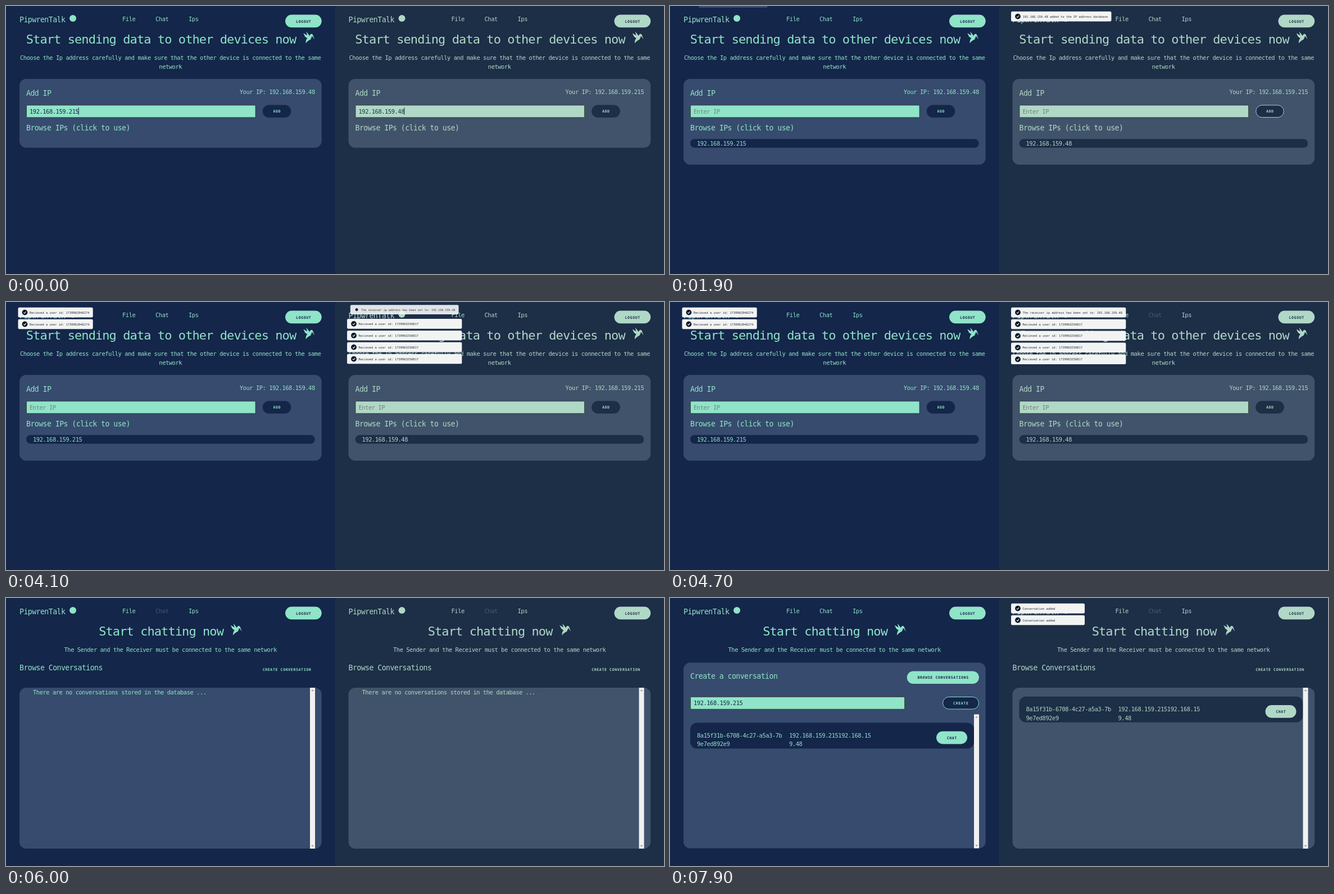
Recreate the animation shown at these times as an HTML page with a canvas. Size 1171x478 px, loop 8000 ms.

```html
<!DOCTYPE html>
<html lang="en">
<head>
<meta charset="utf-8">
<title>Two devices pairing</title>
<style>
html, body { margin: 0; width: 100%; height: 100%; overflow: hidden; background: #14264a; }
canvas { display: block; width: 1171px; height: 478px; }
</style>
</head>
<body>
<canvas id="stage" width="1171" height="478"></canvas>
<script>
const ctx = document.getElementById('stage').getContext('2d');
const LOOP = 8000, SIDE = 585.5, MID = 292.7;
const MONO = '"DejaVu Sans Mono", monospace';
const TRACK = -0.04, ADVANCE = 0.602 + TRACK;
const BODY = 5.83 / ADVANCE, TITLE = 7.4 / ADVANCE, HEAD = 12.33 / ADVANCE;

const LEFT = {
  x: 0, bg: '#14264a', panel: '#364b6d', accent: '#90e4c8',
  own: '192.168.159.48', peer: '192.168.159.215',
  addHover: [560, 1330], added: 800, chatHover: 5800, chatPage: 5900, createPage: 6600,
  talk: 7100, caret: t => t < 200 || (t >= 500 && t < 600)
};
const RIGHT = {
  x: SIDE, bg: '#1d2e47', panel: '#40536a', accent: '#b0d8c6',
  own: '192.168.159.215', peer: '192.168.159.48',
  addHover: [1400, 3500], added: 1600, chatHover: 4500, chatPage: 5000, createPage: Infinity,
  talk: 7500, caret: t => t < 200 || (t >= 500 && t < 800)
};

const toast = (side, text, start, end, minWidth = 0) => ({ side, text, start, end, minWidth });
const ipAdded = ip => ip + ' added to the IP address database';
const ipSet = ip => 'The receiver ip address has been set to: ' + ip;
const gotId = id => 'Recieved a user id: ' + id;
const toasts = [
  toast(LEFT, ipAdded(LEFT.peer), 600, 1800),
  toast(LEFT, ipSet(LEFT.peer), 2600, 3800),
  toast(LEFT, gotId('1739962946274'), 3600, 4955),
  toast(LEFT, gotId('1739962946274'), 3700, 4955),
  toast(RIGHT, ipAdded(RIGHT.peer), 1500, 2600),
  ...[3500, 3600, 3700, 3800].map(s => toast(RIGHT, gotId('1739963250817'), s, 5200)),
  toast(RIGHT, ipSet(RIGHT.peer), 4008, 5200),
  toast(RIGHT, 'Conversation added', 7410, 9000, 131),
  toast(RIGHT, 'Conversation added', 7580, 9000, 131)
];
const ENTER = 210, EXIT = 240, SLIDE = 138;

const clamp = v => Math.max(0, Math.min(1, v));
const mix = (a, b, p) => a + (b - a) * p;
const ramp = (t, start, length = 90) => clamp((t - start) / length);

function bezier(x1, y1, x2, y2) {
  const at = (a, b, s) => 3 * (1 - s) ** 2 * s * a + 3 * (1 - s) * s * s * b + s ** 3;
  return x => {
    if (x <= 0 || x >= 1) return clamp(x);
    let lo = 0, hi = 1;
    for (let i = 0; i < 24; i++) {
      const m = (lo + hi) / 2;
      if (at(x1, x2, m) < x) lo = m; else hi = m;
    }
    return at(y1, y2, lo);
  };
}
const easeIn = bezier(.21, 1.02, .73, 1);
const easeOut = bezier(.06, .71, .55, 1);

// y is the middle of the capital letters
function text(str, x, y, size, color, { align = 'left', track = TRACK, weight = 'normal' } = {}) {
  ctx.font = `${weight} ${size}px ${MONO}`;
  ctx.letterSpacing = `${track * size}px`;
  ctx.textAlign = align;
  ctx.fillStyle = color;
  ctx.fillText(str, x, y + size * 0.365);
}

function box(x, y, w, h, r, fill, stroke) {
  ctx.beginPath();
  ctx.roundRect(x, y, w, h, r);
  if (fill) { ctx.fillStyle = fill; ctx.fill(); }
  if (stroke) { ctx.strokeStyle = stroke; ctx.lineWidth = 1; ctx.stroke(); }
}

function button(label, x, y, w, fill, ink, ring = 0, ringColor = ink) {
  box(x, y, w, 22.7, 11.35, fill);
  if (ring) {
    ctx.globalAlpha = ring;
    box(x + .5, y + .5, w - 1, 21.7, 10.85, null, ringColor);
    ctx.globalAlpha = 1;
  }
  text(label, x + w / 2 + .3, y + 11.7, 6.5, ink, { align: 'center', track: .1, weight: 'bold' });
}

function field(value, y, w, s, color = s.bg) {
  box(36.5, y, w, 21.8, 1.5, s.accent, 'rgba(50,55,25,.75)');
  text(value, 42, y + 10.8, BODY, color);
}

function shape(points, color) {
  ctx.beginPath();
  points.forEach(([x, y]) => ctx.lineTo(x, y));
  ctx.closePath();
  ctx.fillStyle = color;
  ctx.fill();
}

function hummingbird(x, y, color) {
  ctx.save();
  ctx.translate(x, y);
  shape([[0, 3], [7, 7], [5, 0], [10, 6], [11, 10], [8, 13], [3, 9]], color);
  shape([[8, 11], [12, 6], [14, 4], [16.5, 5], [20, 14], [15.5, 8], [13, 14], [8, 17], [4, 21], [5, 15]], color);
  ctx.restore();
}

function heading(str, s) {
  const width = str.length * 12.33, x = MID - (width + 33) / 2;
  text(str, x, 59, HEAD, s.accent);
  hummingbird(x + width + 12.5, 45.5, s.accent);
}

function scrollbar(y, bottom) {
  ctx.fillStyle = '#f1f1f1';
  ctx.fillRect(541, y, 9, bottom - y);
  shape([[543.2, y + 6], [545.5, y + 3.5], [547.8, y + 6]], '#8c8c8c');
  shape([[543.2, bottom - 6], [545.5, bottom - 3.5], [547.8, bottom - 6]], '#8c8c8c');
}

function conversation(y, s) {
  box(36, y, 505, 46, 12, s.bg);
  text('8a15f31b-6708-4c27-a5a3-7b', 48, y + 22.6, BODY, s.accent);
  text('9e7ed892e9', 48, y + 38.2, BODY, s.accent);
  text('192.168.159.215192.168.15', 212, y + 22.6, BODY, s.accent);
  text('9.48', 212, y + 38.2, BODY, s.accent);
  button('CHAT', 474, y + 15.3, 55, s.accent, s.bg);
}

function navbar(s, t) {
  text('PipwrenTalk', 24, 24, TITLE, s.accent);
  ctx.fillStyle = s.accent;
  ctx.beginPath();
  ctx.arc(119, 22, 6, 0, Math.PI * 2);
  ctx.fill();
  text('File', 207, 23, BODY, s.accent);
  text('Ips', 325, 23, BODY, s.accent);
  const dim = t < s.createPage ? ramp(t, s.chatHover) : 0;
  ctx.globalAlpha = mix(1, .32, dim);
  text('Chat', 266, 23, BODY, dim > .5 ? '#b9bcc0' : s.accent);
  ctx.globalAlpha = 1;
  button('LOGOUT', 497, 15.6, 64.7, s.accent, s.bg);
}

function ipPage(s, t) {
  const added = t >= s.added, center = { align: 'center' };
  heading('Start sending data to other devices now', s);
  text('Choose the Ip address carefully and make sure that the other device is connected to the same',
    MID, 92.3, BODY, s.accent, center);
  text('network', MID, 107.8, BODY, s.accent, center);
  box(24, 130, 537.7, added ? 153 : 122.7, 12, s.panel);
  text('Add IP', 36, 154.7, TITLE, s.accent);
  text('Your IP: ' + s.own, 549.7, 153.5, BODY, s.accent, { align: 'right' });
  if (added) field('Enter IP', 177, 407.5, s, '#757f7a');
  else {
    field(s.peer, 177, 407.5, s);
    if (s.caret(t)) {
      ctx.fillStyle = s.bg;
      ctx.fillRect(42 + s.peer.length * 5.83 - .8, 181, 1, 13);
    }
  }
  const [on, off] = s.addHover;
  button('ADD', 456.7, 176.4, 50.6, s.bg, s.accent, ramp(t, on) - ramp(t, off));
  text('Browse IPs (click to use)', 36, 216.8, TITLE, s.accent);
  if (added) {
    box(36, 237.2, 513.8, 15.6, 7.8, s.bg);
    text(s.peer, 48, 245, BODY, s.accent);
  }
}

function chatIntro(s) {
  heading('Start chatting now', s);
  text('The Sender and the Receiver must be connected to the same network',
    MID, 92.3, BODY, s.accent, { align: 'center' });
}

function chatPage(s, t) {
  chatIntro(s);
  text('Browse Conversations', 24, 124.3, TITLE, s.accent);
  const ring = s === LEFT ? ramp(t, 6330, 70) : 0;
  button('CREATE CONVERSATION', 437.7, 115.7, 124, s.bg, s.accent, ring);
  box(24, 160, 537.7, 287, 12, s.panel);
  if (t >= s.talk) conversation(175.8, s);
  else text('There are no conversations stored in the database ...', 48, 167.8, BODY, s.accent);
  scrollbar(160, 447);
}

function createPage(s, t) {
  chatIntro(s);
  box(24, 115.2, 537.7, 331.2, 12, s.panel);
  text('Create a conversation', 36, 139.3, TITLE, s.accent);
  button('BROWSE CONVERSATIONS', 421.7, 130.4, 128.2, s.accent, s.bg);
  field(s.peer, 176.5, 381, s);
  button('CREATE', 485, 176, 65, s.bg, s.accent, ramp(t, 6900));
  if (t >= s.talk) conversation(222.4, s);
  scrollbar(207.5, 446.4);
}

function tick(x, y, age) {
  ctx.save();
  ctx.translate(x, y);
  const grow = easeIn(clamp((age - 60) / 180));
  ctx.scale(grow, grow);
  ctx.rotate((1 - grow) * Math.PI / 4);
  ctx.fillStyle = '#0b1829';
  ctx.beginPath();
  ctx.arc(0, 0, 4.9, 0, Math.PI * 2);
  ctx.fill();
  if (age > 150) {
    ctx.strokeStyle = '#fff';
    ctx.lineWidth = 1.1;
    ctx.beginPath();
    ctx.moveTo(-2.1, .2);
    ctx.lineTo(-.6, 1.7);
    ctx.lineTo(2.2, -1.6);
    ctx.stroke();
  }
  ctx.restore();
}

const naturalWidth = n => Math.max(n.minWidth, n.text.length * 3.233 + 26.5);

function drawToasts(s, t) {
  const live = toasts.filter(n => n.side === s && t >= n.start && t < n.end + EXIT &&
    !(n.start < s.chatPage && t >= s.chatPage));
  const w = Math.max(...live.map(naturalWidth)), h = 17.6;
  for (const n of live) {
    const row = live.reduce((sum, o) =>
      sum + (o.start > n.start ? easeIn(clamp((t - o.start) / SLIDE)) : 0), 0);
    const p = easeIn(clamp((t - n.start) / ENTER));
    const q = easeOut(clamp((t - n.end) / EXIT));
    const scale = mix(.6, 1, p) * mix(1, .6, q);
    ctx.save();
    ctx.globalAlpha = mix(.5, 1, p) * (1 - q);
    ctx.translate(21.5 + w / 2, 18.6 + row * 20.9 - (2 * (1 - p) + 1.5 * q) * h);
    ctx.scale(scale, scale);
    ctx.translate(-w / 2, -h / 2);
    box(0, 0, w, h, 2.2, '#f2f4f4');
    tick(12, h / 2, t - n.start);
    text(n.text, 20.5, h / 2 + .1, 5.37, '#252b33', { track: 0 });
    ctx.restore();
  }
}

function drawSide(s, t) {
  ctx.save();
  ctx.translate(s.x, 0);
  ctx.fillStyle = s.bg;
  ctx.fillRect(0, 0, SIDE, 478);
  navbar(s, t);
  if (t >= s.createPage) createPage(s, t);
  else if (t >= s.chatPage) chatPage(s, t);
  else ipPage(s, t);
  drawToasts(s, t);
  ctx.restore();
}

const begin = performance.now();
function frame() {
  const t = (performance.now() - begin) % LOOP;
  drawSide(LEFT, t);
  drawSide(RIGHT, t);
  requestAnimationFrame(frame);
}
frame();
</script>
</body>
</html>
```
